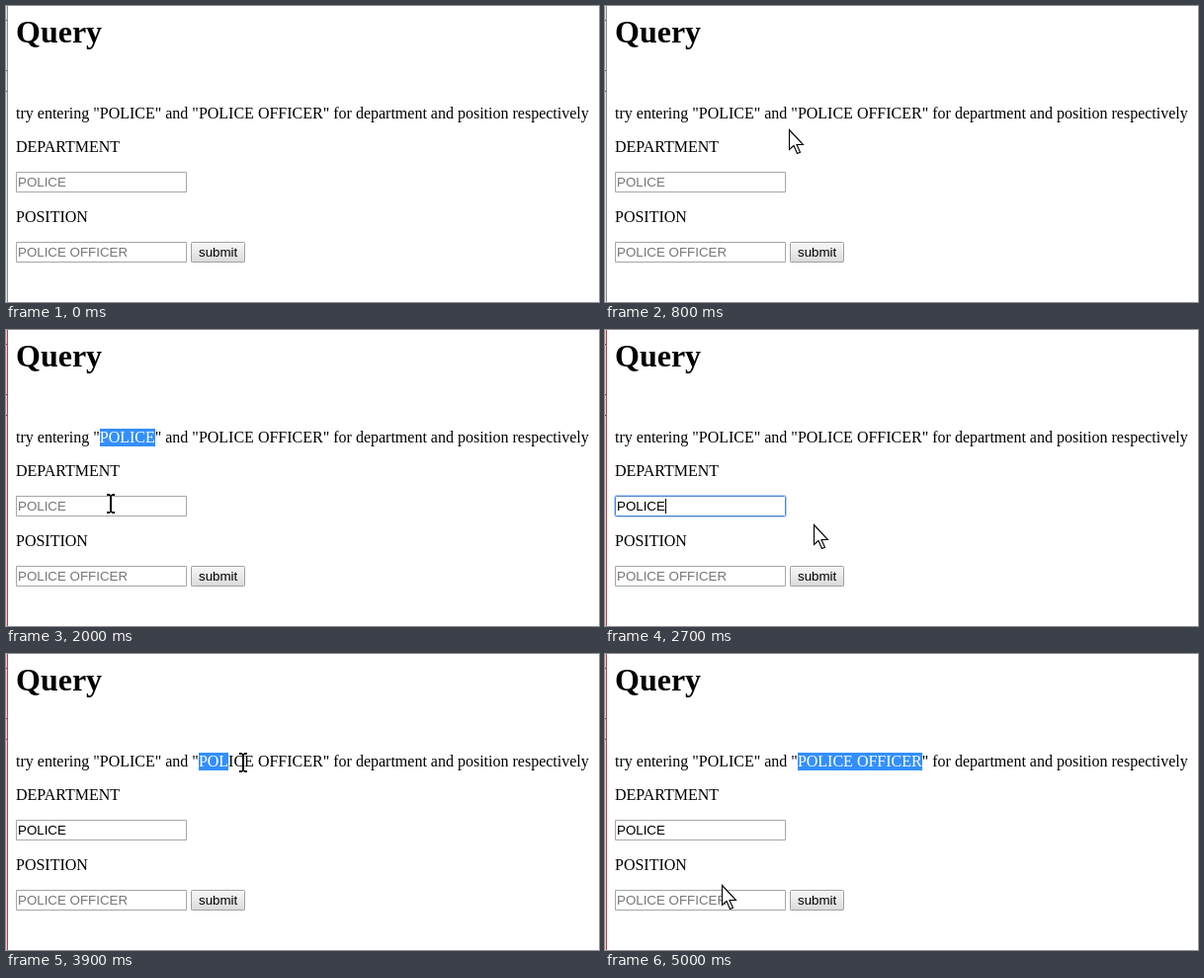
These frames come from a looping animation (600 px wide and 300 px high, 5100 ms). An HTML page with a canvas:

```html
<!DOCTYPE html>
<html lang="en">
<head>
<meta charset="utf-8">
<title>Query</title>
<style>
  html, body { margin: 0; width: 100%; height: 100%; overflow: hidden; background: #fff; }
  canvas { display: block; }
</style>
</head>
<body>
<canvas id="stage" width="600" height="300"></canvas>
<script>
const ctx = document.getElementById('stage').getContext('2d');
const LOOP = 5100, STEP = 100;
const SERIF = '16px "Liberation Serif", "Times New Roman", serif';
const HEADING = 'bold 32px "Liberation Serif", "Times New Roman", serif';
const SANS = '13.333px "Liberation Sans", Arial, sans-serif';

const LEFT = 10, FIELD_W = 173, FIELD_H = 21;
const HINT = 'try entering "POLICE" and "POLICE OFFICER" for department and position respectively';
const lines = [
  { str: HINT, y: 114 },
  { str: 'DEPARTMENT', y: 148 },
  { str: 'POSITION', y: 219 }
];
const DEPARTMENT_Y = 168, POSITION_Y = 239;

const PASTED = 2300, FOCUS = 2100, BLUR = 3000, DRAG = 3700, DRAG_LAG = 50;

// The pointer eases to each spot in turn and rests between moves
const entry = { x: 420, y: 225 };
const moves = [
  { from: 400, to: 800, x: 186, y: 125 },
  { from: 800, to: 1300, x: 127, y: 105 },
  { from: 1400, to: 2000, x: 106, y: 176 },
  { from: 2400, to: 2700, x: 211, y: 197 },
  { from: 2700, to: 3000, x: 296, y: 182 },
  { from: 3000, to: 3600, x: 198, y: 110 },
  { from: DRAG, to: 4200, x: 317, y: 110 },
  { from: 4400, to: 5000, x: 118, y: 234 }
];

function ease(t, from, to) {
  const k = Math.min(1, Math.max(0, (t - from) / (to - from)));
  return k * k * (3 - 2 * k);
}

function pointerAt(t) {
  let { x, y } = entry;
  for (const m of moves) {
    const k = ease(t, m.from, m.to);
    x += (m.x - x) * k;
    y += (m.y - y) * k;
  }
  return { x: Math.round(x), y: Math.round(y) };
}

function text(str, x, y, font, color = '#000') {
  ctx.font = font;
  ctx.fillStyle = color;
  ctx.fillText(str, x, y);
}

function widthOf(str) {
  ctx.font = SERIF;
  return ctx.measureText(str).width;
}

const hintX = n => LEFT + widthOf(HINT.slice(0, n));

function select(from, to) {
  if (to <= from) return;
  const x = Math.round(hintX(from)), w = Math.round(hintX(to)) - x;
  ctx.save();
  ctx.beginPath();
  ctx.rect(x, 100, w, 18);
  ctx.clip();
  ctx.fillStyle = '#338fff';
  ctx.fillRect(x, 100, w, 18);
  text(HINT, LEFT, lines[0].y, SERIF, '#fff');
  ctx.restore();
}

// Index after the last character whose middle the drag has passed
function dragEnd(from, to, x) {
  let n = from;
  while (n < to && (hintX(n) + hintX(n + 1)) / 2 <= x) n++;
  return n;
}

function selection(t) {
  const word = 'POLICE', phrase = 'POLICE OFFICER';
  if (t >= 1500 && t < FOCUS) {
    const start = HINT.indexOf(word);
    select(start, start + word.length);
  } else if (t > DRAG) {
    const start = HINT.indexOf(phrase);
    const x = pointerAt(Math.min(t, 4400) - DRAG_LAG).x;
    select(start, dragEnd(start, start + phrase.length, x));
  }
}

function outline(x, y, w, h, r, color) {
  ctx.strokeStyle = color;
  ctx.lineWidth = 1;
  ctx.beginPath();
  ctx.roundRect(x + 0.5, y + 0.5, w - 1, h - 1, r);
  ctx.stroke();
}

function field(y, str, filled, focused) {
  if (focused) {
    outline(LEFT - 1, y - 1, FIELD_W + 2, FIELD_H + 2, 2, 'rgba(77,144,254,0.4)');
    outline(LEFT, y, FIELD_W, FIELD_H, 1, '#4c84d0');
    ctx.fillStyle = '#000';
    ctx.fillRect(filled ? 61 : 12, y + 3, 1, 15);
  } else {
    outline(LEFT, y, FIELD_W, FIELD_H, 0, '#a6a6a6');
  }
  text(str, LEFT + 2, y + 15, SANS, filled ? '#000' : '#777');
}

function button(x, y, w, h) {
  const g = ctx.createLinearGradient(0, y, 0, y + h);
  g.addColorStop(0, '#f8f8f8');
  g.addColorStop(1, '#dadada');
  ctx.fillStyle = g;
  ctx.fillRect(x, y, w, h);
  outline(x, y, w, h, 1, '#a0a0a0');
  text('submit', x + 8, y + 15, SANS);
}

function arrow({ x, y }) {
  ctx.save();
  ctx.translate(x + 0.5, y + 0.5);
  ctx.fillStyle = '#fff';
  ctx.strokeStyle = '#000';
  ctx.lineWidth = 1.1;
  const shape = new Path2D('M0 0V20L4.5 16L8 24L11 22.7L7.5 15H14Z');
  ctx.fill(shape);
  ctx.stroke(shape);
  ctx.restore();
}

function ibeam({ x, y }) {
  ctx.fillStyle = '#000';
  ctx.fillRect(x - 1, y - 9, 2, 18);
  for (const dy of [-10, 8]) {
    ctx.fillRect(x - 4, y + dy, 3, 2);
    ctx.fillRect(x + 1, y + dy, 3, 2);
  }
}

function overText({ x, y }) {
  const inside = (top, w, h) => x >= LEFT && x < LEFT + w && y >= top && y < top + h;
  return lines.some(l => inside(l.y - 15, widthOf(l.str), 20)) ||
    [DEPARTMENT_Y, POSITION_Y].some(top => inside(top, FIELD_W, FIELD_H));
}

function leftEdge(red) {
  ctx.fillStyle = red ? '#ecc8c8' : '#e0e0e0';
  ctx.fillRect(0, 0, 1, 300);
  ctx.fillStyle = red ? '#b04848' : '#8c8c8c';
  ctx.fillRect(1, 0, 1, 300);
  ctx.fillStyle = red ? '#8a3030' : '#555';
  for (const y of [14, 65, 86]) ctx.fillRect(0, y, 1, 1);
}

function draw(t) {
  ctx.fillStyle = '#fff';
  ctx.fillRect(0, 0, 600, 300);
  leftEdge(t >= 1300);

  text('Query', LEFT, 37, HEADING);
  for (const l of lines) text(l.str, LEFT, l.y, SERIF);
  selection(t);

  field(DEPARTMENT_Y, 'POLICE', t >= PASTED, t >= FOCUS && t < BLUR);
  field(POSITION_Y, 'POLICE OFFICER', false, false);
  button(187, POSITION_Y, 55, FIELD_H);

  if (t >= moves[0].from) {
    const p = pointerAt(t);
    (overText(p) ? ibeam : arrow)(p);
  }
}

const start = performance.now();
function tick() {
  const t = (performance.now() - start) % LOOP;
  draw(Math.floor(t / STEP) * STEP);
  requestAnimationFrame(tick);
}
tick();
</script>
</body>
</html>
```
